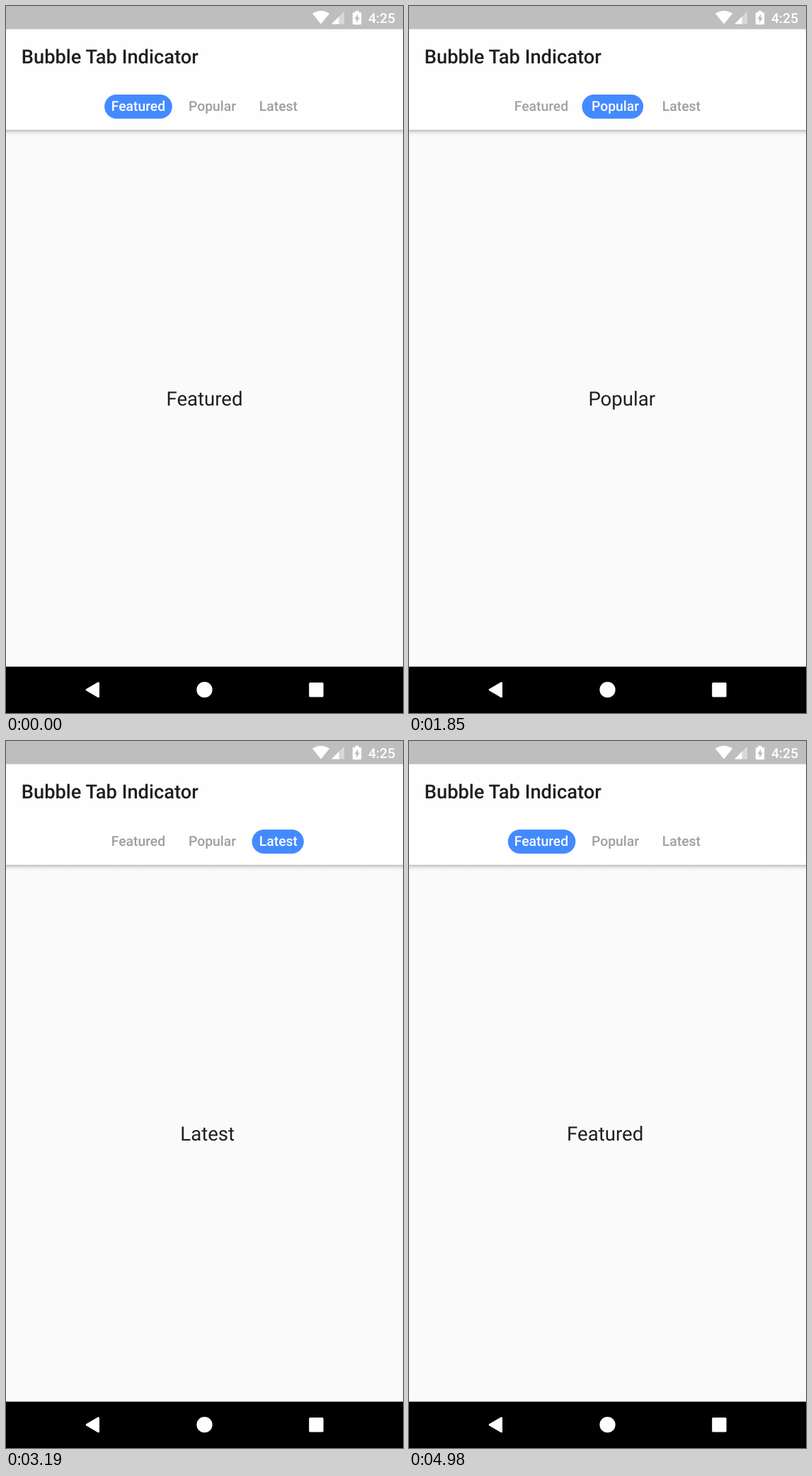
Write an HTML page that moves like this. It is 561 px wide and 998 px high and loops after 5.02 s.

```html
<!DOCTYPE html>
<html lang="en">
<head>
<meta charset="utf-8">
<title>Bubble Tab Indicator</title>
<style>
  html, body { margin: 0; width: 100%; height: 100%; overflow: hidden; background: #fafafa; }
  svg { display: block; width: 100vw; height: 100vh; overflow: hidden; }
  text { font-family: Roboto, "Noto Sans", sans-serif; text-rendering: geometricPrecision; }
  .title { font-size: 27.27px; font-weight: 500; fill: #1f1f1f; }
  .clock { font-size: 19.3px; font-weight: 500; fill: #fff; }
  .tab { font-size: 19.35px; font-weight: 500; text-anchor: middle; }
  .page { font-size: 27.6px; fill: #1f1f1f; text-anchor: middle; }
</style>
</head>
<body>
<svg viewBox="0 0 561 998">
  <defs>
    <linearGradient id="shade" x1="0" y1="0" x2="0" y2="1">
      <stop offset="0" stop-color="#000" stop-opacity=".28"/>
      <stop offset=".25" stop-color="#000" stop-opacity=".15"/>
      <stop offset=".6" stop-color="#000" stop-opacity=".04"/>
      <stop offset="1" stop-color="#000" stop-opacity="0"/>
    </linearGradient>
  </defs>

  <rect width="561" height="998" fill="#fafafa"/>
  <g id="pages"></g>

  <!-- app bar -->
  <rect y="174.5" width="561" height="9" fill="url(#shade)"/>
  <rect width="561" height="174.7" fill="#fefefe"/>
  <text class="title" x="21.8" y="80.8">Bubble Tab Indicator</text>
  <rect id="bubble" y="125" height="34" rx="17" fill="#448aff"/>
  <g id="tabs"></g>

  <!-- status bar -->
  <rect width="561" height="32.7" fill="#bebebe"/>
  <g fill="#fff">
    <path d="M445 25.5 L432.8 10.6 Q445 2.8 457.2 10.6 Z"/>
    <path d="M478 7.5 V25.5 H460 Z" opacity=".4"/>
    <path d="M470.5 15 V25.5 H460 Z"/>
    <path d="M493.5 6.8 h5 v2.2 h2.3 q1.4 0 1.4 1.4 v14.4 q0 1.4 -1.4 1.4 h-9.6 q-1.4 0 -1.4 -1.4 v-14.4 q0 -1.4 1.4 -1.4 h2.3 Z"/>
    <path d="M497.3 11.2 L492.4 18.6 H495.2 V23.8 L499.8 16.4 H497.3 Z" fill="#bebebe"/>
  </g>
  <text class="clock" x="511.9" y="24">4:25</text>

  <!-- navigation bar -->
  <rect y="932.6" width="561" height="65.4" fill="#000"/>
  <g fill="#fff" stroke="#fff" stroke-width="3" stroke-linejoin="round">
    <path d="M114.2 965.2 L130.5 955.7 V974.7 Z"/>
    <circle cx="280.5" cy="965.2" r="9.6"/>
    <rect x="429.7" y="956.6" width="17.4" height="17.4"/>
  </g>
</svg>

<script>
const LOOP = 5020, WIDTH = 561, INSET = 6.8;
const names = ["Featured", "Popular", "Latest"];
const edges = [132.3, 241.6, 341.5, 428.3];
const bubble = document.getElementById("bubble");

const addTexts = (id, y) => names.map((name, i) => {
  const el = document.createElementNS("http://www.w3.org/2000/svg", "text");
  el.setAttribute("class", id.slice(0, -1));
  el.setAttribute("x", id === "tabs" ? (edges[i] + edges[i + 1]) / 2 : WIDTH / 2);
  el.setAttribute("y", y);
  el.textContent = name;
  document.getElementById(id).append(el);
  return el;
});
const tabs = addTexts("tabs", 148.3);
const pages = addTexts("pages", 563.7);

// Screen refreshes: [first, last, count]; the picture holds in between.
const bursts = [
  [0, 0, 1], [1400, 1450, 2], [1500, 1580, 3], [1630, 1850, 6], [1940, 2110, 5],
  [2160, 2160, 1], [2340, 2650, 7], [2740, 2830, 3], [2880, 3190, 8], [3230, 3380, 4],
  [3420, 3810, 9], [3910, 3910, 1], [3980, 4350, 7], [4490, 4980, 11]
];
const ticks = bursts.flatMap(([first, last, n]) =>
  Array.from({ length: n }, (_, i) => first + (n > 1 ? i * (last - first) / (n - 1) : 0)));
const refresh = t => ticks.filter(k => k <= t + 0.01).pop();

// Remaining distance of an overdamped page spring, ms after release.
const spring = (slow, fast, ms) =>
  slow * Math.exp(-0.00907 * ms) + fast * Math.exp(-0.022 * ms);
const part = (t, from, to) => Math.min(1, Math.max(0, (t - from) / (to - from)));
const smooth = u => u * u * (3 - 2 * u);

// Scroll position in pages: a finger drag, then a spring, four times.
function position(t) {
  if (t < 1400) return 0;
  if (t < 1630) return 0.0075 * part(t, 1350, 1450) + 0.4725 * part(t, 1450, 1630) ** 1.8;
  if (t < 2160) return 1 - spring(0.25, 0.27, t - 1630);
  if (t < 2300) return 1;
  if (t < 2700) return 1 + 0.484 * smooth(part(t, 2300, 2700));
  if (t < 3380) return 2 - spring(0.64, -0.124, t - 2700);
  if (t < 3610) return 2 - 0.445 * part(t, 3380, 3610) ** 1.8;
  if (t < 4150) return 1 + spring(0.355, 0.2, t - 3610);
  if (t < 4490) return 1 - 0.24 * part(t, 4150, 4350) ** 1.5;
  return spring(0.51, -0.11, t - 4490);
}

function edgeAt(p) {
  const i = Math.min(edges.length - 2, Math.floor(p));
  return edges[i] + (edges[i + 1] - edges[i]) * (p - i);
}

function draw(now) {
  const p = position(refresh(now % LOOP));
  const left = edgeAt(p) + INSET;
  bubble.setAttribute("x", left);
  bubble.setAttribute("width", edgeAt(p + 1) - INSET - left);
  names.forEach((_, i) => {
    const near = Math.max(0, 1 - Math.abs(p - i));
    const grey = Math.round(158 + 97 * near);
    tabs[i].setAttribute("fill", `rgb(${grey},${grey},${grey})`);
    pages[i].setAttribute("transform", `translate(${(i - p) * WIDTH} 0)`);
  });
}

const start = performance.now();
function loop() {
  draw(performance.now() - start);
  requestAnimationFrame(loop);
}
loop();
</script>
</body>
</html>
```
